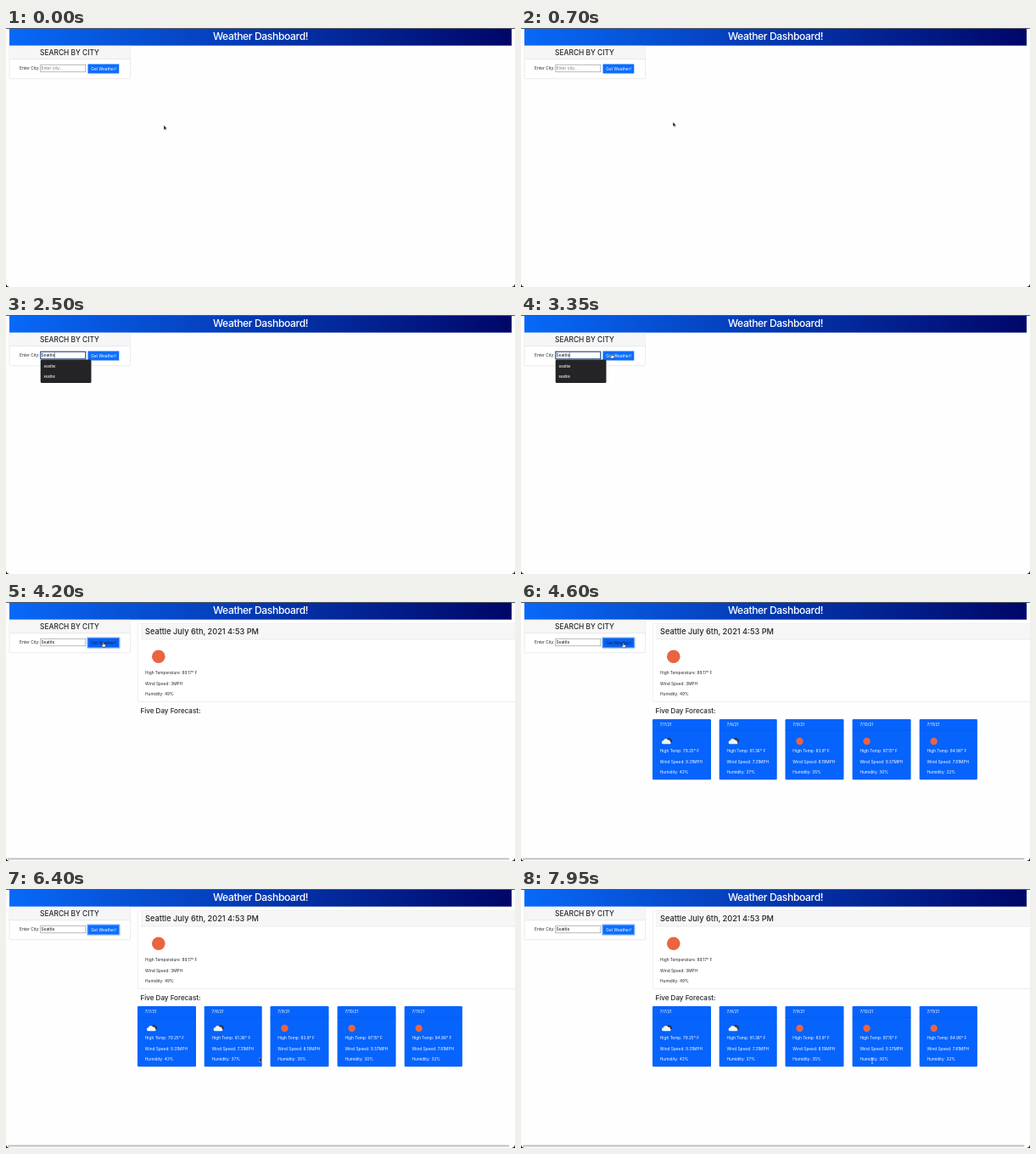
Write an HTML page that moves like this. It is 600x305 px and loops after 8000 ms.

```html
<!DOCTYPE html>
<html lang="en">
<head>
<meta charset="utf-8">
<title>Weather Dashboard</title>
<style>
html, body { margin: 0; width: 100%; height: 100%; overflow: hidden; background: #fefefe; }
svg { display: block; width: 100%; height: 100%; }
text { font: 4.8px Inter, "Open Sans", sans-serif; fill: #212529; white-space: pre; }
.h { font-weight: 500; }
.w { fill: #fff; }
.menu text { font-size: 4.1px; font-weight: 600; fill: #e6e6e6; }
</style>
</head>
<body>
<svg id="stage" viewBox="0 0 600 305" preserveAspectRatio="none">
  <defs>
    <linearGradient id="bar"><stop stop-color="#0869f8"/><stop offset="1" stop-color="#000668"/></linearGradient>
    <g id="cloud">
      <path d="M0-2.2a2.5 2.5 0 0 1 4.6-.3a1.9 1.9 0 0 1 .9 3.4H1z" fill="#343438"/>
      <path d="M-4 3.3a2 2 0 0 1-.2-4a3.1 3.1 0 0 1 5.7-.7a2.4 2.4 0 0 1 2.6 2.4a1.3 1.3 0 0 1-.6 2.3z" fill="#f4f4f4"/>
    </g>
    <circle id="sun" r="4.2" fill="#ea6440"/>
  </defs>
  <rect width="600" height="305" fill="#fefefe"/>
  <rect width="600" height="1" fill="#55585c"/>
  <rect x="4" y="1" width="592" height="19.7" fill="url(#bar)"/>
  <text class="h w" x="300" y="14" text-anchor="middle" style="font-size:12.1px;letter-spacing:-.03em">Weather Dashboard!</text>

  <rect x="4" y="21.3" width="142.5" height="38.4" rx="1" fill="#fff" stroke="#dedede" stroke-width=".6"/>
  <rect x="4.3" y="21.6" width="142" height="15" fill="#f6f6f6"/>
  <path d="M4 36.7H146.5" stroke="#dedede" stroke-width=".6"/>
  <text class="h" x="75" y="32.2" text-anchor="middle" style="font-size:8.4px">SEARCH BY CITY</text>
  <text x="16" y="49.3">Enter City:</text>
  <rect id="field" x="40.8" y="43.2" width="53" height="8.6" fill="#fff"/>
  <text id="entry" x="41.5" y="49.3"></text>
  <path id="caret" d="M0 44.4V50.6" stroke="#111" stroke-width=".5"/>
  <rect id="ring" x="95.2" y="41.2" width="39.4" height="13.6" rx="1.2" fill="#9cc3fd"/>
  <rect id="button" x="96.5" y="42.5" width="36.8" height="11"/>
  <text id="label" x="115" y="49.8" text-anchor="middle">Get Weather!</text>

  <g id="menu" class="menu">
    <rect id="menuBox" x="40.7" y="52.6" width="59.8" rx="1.5" fill="#242426"/>
    <text x="44.5" y="62.3">Seattle</text>
    <text id="second" x="44.5" y="73.5"></text>
    <text id="third" x="44.5" y="84.8">seattle</text>
  </g>

  <g id="today">
    <rect x="155.3" y="25.6" width="460" height="91.8" rx="1" fill="#fff" stroke="#e2e2e2" stroke-width=".6"/>
    <rect x="159" y="26.5" width="441" height="17.4" fill="#f6f6f6"/>
    <path d="M159 44H600" stroke="#e2e2e2" stroke-width=".6"/>
    <text class="h" x="164" y="38.4" style="font-size:9.2px">Seattle July 6th, 2021 4:53 PM</text>
    <use href="#sun" transform="translate(179.8 64.3) scale(1.86)"/>
    <text x="164" y="85.2">High Temperature: 89.17° F</text>
    <text x="164" y="97.8">Wind Speed: 3MPH</text>
    <text x="164" y="110.2">Humidity: 49%</text>
    <text class="h" x="158.5" y="130.8" style="font-size:8.05px">Five Day Forecast:</text>
    <rect x="2" y="301.4" width="591.5" height="2.2" rx="1.1" fill="#bfbfbf"/>
  </g>
  <g id="days"></g>
  <path d="M0 302V305H3Q0 305 0 302ZM600 302V305H597Q600 305 600 302Z" fill="#000" stroke="#000" stroke-width=".6"/>

  <g id="cursor">
    <path id="arrow" d="M0 0V5.3L1.3 4.2L2.1 6L3 5.6L2.2 3.9H3.8Z" fill="#111" stroke="#fff" stroke-width=".35"/>
    <path id="hand" d="M-.5.4Q0-.4.5.4V2.4L2.6 2.9Q3.2 3.1 3 4L2.5 6H-.6L-2.2 3.8Q-2.3 3-1.5 3.3L-.5 4Z" fill="#fff" stroke="#111" stroke-width=".5"/>
    <path id="beam" d="M-1.2 0Q0 0 0 .8Q0 0 1.2 0M0 .8V5.8M-1.2 6.6Q0 6.6 0 5.8Q0 6.6 1.2 6.6" fill="none" stroke-width=".6"/>
  </g>
</svg>
<script>
const LOOP = 8000, STEP = 50;
const TYPE = 1600, SUBMIT = 3700, RESULT = 4100, FORECAST = 4250;
const $ = id => document.getElementById(id);
const show = (id, on) => $(id).setAttribute('display', on ? 'inline' : 'none');
const set = (id, attrs) => { for (const k in attrs) $(id).setAttribute(k, attrs[k]); };

const forecast = [
  [155, 69, '7/7/21', 'cloud', '79.25', '9.31', 43],
  [233.7, 68, '7/8/21', 'cloud', '81.36', '7.31', 37],
  [311.5, 69, '7/9/21', 'sun', '83.8', '8.19', 35],
  [390.6, 69, '7/10/21', 'sun', '87.15', '9.37', 30],
  [469.7, 68.2, '7/11/21', 'sun', '84.96', '7.81', 32]
];
$('days').innerHTML = forecast.map(([x, w, date, icon, temp, wind, hum]) => `
  <g transform="translate(${x} 138)">
    <rect width="${w}" height="71.3" rx="1.2" fill="#0663fc"/>
    <path d="M0 13.2H${w}" stroke="#0558e2" stroke-width=".6"/>
    <use href="#${icon}" x="17" y="26"/>
    ${[date, `High Temp: ${temp}° F`, `Wind Speed: ${wind}MPH`, `Humidity: ${hum}%`]
      .map((s, i) => `<text class="w" x="8.8" y="${[8.2, 39.2, 51.8, 64.3][i]}">${s}</text>`).join('')}
  </g>`).join('');

// Pointer stops: time, x, y
const route = [
  [0, 186, 114.6], [600, 186, 114.6], [1300, 62, 45], [2700, 62, 45], [3300, 106.5, 45],
  [3700, 114.5, 47], [4300, 114.5, 47], [5000, 130, 49], [5600, 130, 49],
  [5950, 218, 168], [6150, 262, 218], [6400, 298.5, 198.3], [7000, 345, 198],
  [7500, 396, 197.5], [7950, 414, 199]
];
const ease = u => u * u * (3 - 2 * u);
function pointer(t) {
  const i = route.findIndex(p => p[0] > t);
  if (i < 0) return route[route.length - 1].slice(1);
  const [a, b] = [route[i - 1], route[i]];
  const u = ease((t - a[0]) / (b[0] - a[0]));
  return [a[1] + (b[1] - a[1]) * u, a[2] + (b[2] - a[2]) * u];
}

function draw(t) {
  const word = 'Seattle';
  const count = t < TYPE ? 0 : Math.min(7, 1 + Math.max(0, Math.floor((t - 1610) / 140)));
  const focused = t >= 1350 && t < SUBMIT;
  $('entry').textContent = count ? word.slice(0, count) : 'Enter city...';
  $('entry').style.fill = count ? '#111' : '#757575';
  set('field', focused ? { stroke: '#1c3f78', 'stroke-width': 1.1 } : { stroke: '#8a8a8a', 'stroke-width': .6 });
  show('caret', focused);
  const edge = 41.7 + (count ? $('entry').getComputedTextLength() : 0);
  set('caret', { transform: `translate(${edge} 0)` });

  show('menu', count && t < SUBMIT);
  show('third', count < 2);
  $('second').textContent = count < 2 ? 'sadawdas' : 'seattle';
  set('menuBox', { height: count < 2 ? 38.6 : 27.4 });

  const [x, y] = pointer(t);
  const inButton = x > 96.5 && x < 133.3 && y > 42 && y < 53.5;
  const hover = inButton && t > 3350;
  show('ring', t >= SUBMIT);
  set('button', { fill: hover ? '#0761f0' : '#0d6efd' });
  $('label').style.fill = hover ? '#10204a' : '#fff';

  show('today', t >= RESULT);
  show('days', t >= FORECAST);

  const inField = x > 41 && x < 94 && y > 42 && y < 52;
  const beam = inField || t >= 7700;
  show('cursor', t < TYPE || t >= 2700);
  show('hand', inButton);
  show('beam', beam);
  show('arrow', !inButton && !beam);
  set('beam', { stroke: inField ? '#222' : '#dfe6f5' });
  set('cursor', { transform: `translate(${x} ${y})` });
}

function tick() {
  draw(Math.floor(performance.now() % LOOP / STEP) * STEP);
  requestAnimationFrame(tick);
}
tick();
</script>
</body>
</html>
```
